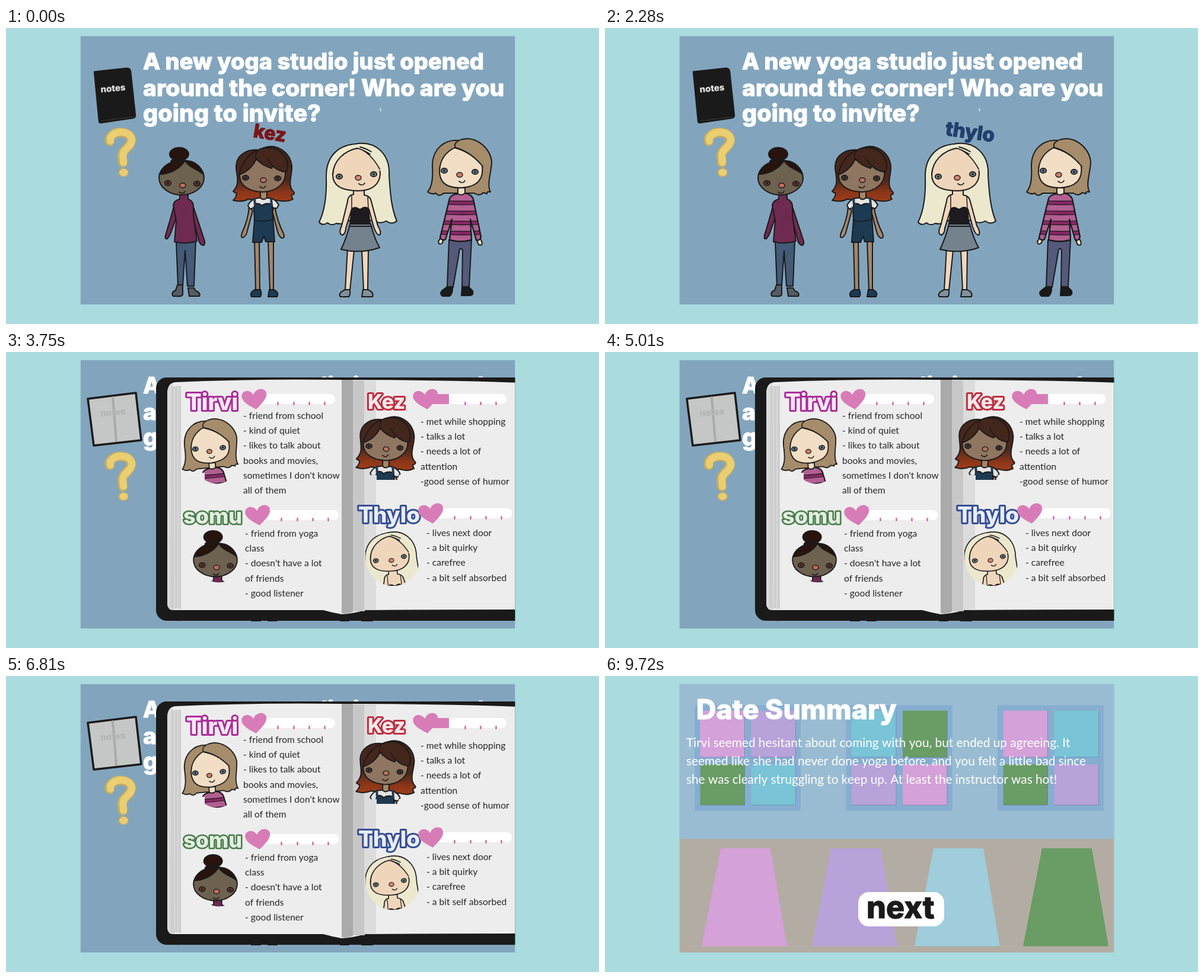
Recreate the animation shown at these times as an HTML page with a canvas. Size 1000x500 px, loop 9.75 s.

```html
<!DOCTYPE html>
<html lang="en">
<head>
<meta charset="utf-8">
<title>Yoga date</title>
<style>
html, body { margin: 0; width: 100%; height: 100%; overflow: hidden; background: #a9dbdf; }
canvas { display: block; width: 1000px; height: 500px; }
</style>
</head>
<body>
<canvas id="stage" width="1000" height="500"></canvas>
<script>
const ctx = document.getElementById('stage').getContext('2d');
const LOOP = 9750;
const INK = '#1b1a1a';
const BUBBLE = 'Inter, sans-serif';
const HAND = 'Lato, sans-serif';
const PINK = '#d4a1d9', PURPLE = '#b7a2da', CYAN = '#79c4d6', GREEN = '#6a9c65';
const PANEL = [125.5, 13.5, 733, 453.5];

function shape(d, fill, line = 2, color = INK) {
  const path = new Path2D(d);
  if (fill) { ctx.fillStyle = fill; ctx.fill(path); }
  if (line) {
    ctx.strokeStyle = color;
    ctx.lineWidth = line;
    ctx.lineJoin = ctx.lineCap = 'round';
    ctx.stroke(path);
  }
}

function oval(x, y, rx, ry, fill, line = 2) {
  ctx.beginPath();
  ctx.ellipse(x, y, rx, ry, 0, 0, 7);
  ctx.fillStyle = fill;
  ctx.fill();
  if (line) { ctx.strokeStyle = INK; ctx.lineWidth = line; ctx.stroke(); }
}

function box(x, y, w, h, fill, r = 0) {
  ctx.beginPath();
  ctx.roundRect(x, y, w, h, r);
  ctx.fillStyle = fill;
  ctx.fill();
}

function bubble(text, x, y, size, fill, outline = fill, line = 1, angle = 0) {
  ctx.save();
  ctx.translate(x, y);
  ctx.rotate(angle);
  ctx.font = `800 ${size}px ${BUBBLE}`;
  ctx.lineJoin = 'round';
  ctx.lineWidth = line;
  ctx.strokeStyle = outline;
  ctx.strokeText(text, 0, 0);
  ctx.fillStyle = fill;
  ctx.fillText(text, 0, 0);
  ctx.restore();
}

function handLines(lines, x, y, step, size, color) {
  ctx.font = `400 ${size}px ${HAND}`;
  ctx.fillStyle = color;
  lines.forEach((line, i) => ctx.fillText(line, x, y + i * step));
}

function face(left, right, nose, mouth, iris, noseColor) {
  for (const [x, y] of [left, right]) {
    oval(x, y, 5.2, 4, iris, 1.8);
    oval(x, y, 2, 1.7, INK, 0);
  }
  oval(nose[0], nose[1], 5, 4, noseColor, 1.5);
  shape(`M${mouth[0] - 5} ${mouth[1]}q6 5 10 -1`, null, 1.7);
}

const girls = {
  somu() {
    const skin = '#6d6250', hair = '#28130f', wool = '#6f2a52', denim = '#435a78';
    shape('M284 298Q277 324 269 350Q267 357 272 356Q276 352 278 346L288 318Z', wool);
    shape('M314 296Q324 326 335 360Q336 368 331 367Q326 364 325 358L315 320Z', wool);
    shape('M287 360L290 436H298L302 376L306 436H317L320 360Z', denim);
    shape('M289 434H298V450Q297 454 289 453H282Q277 447 286 443Z', '#555c63');
    shape('M307 439H317L320 444Q329 447 326 453H309Z', '#555c63');
    shape('M293 281V289Q284 291 282 299L287 326L284 361Q304 366 322 360L316 318V299Q314 291 307 289V281Z', wool);
    oval(292, 213, 16, 11, hair);
    oval(291, 226, 13, 5.5, hair);
    oval(296, 253, 38, 29, skin);
    shape('M260 247C264 231 280 224 302 224C294 237 278 246 260 247Z', hair);
    shape('M302 224C317 224 329 233 333 247C322 238 308 236 302 224Z', hair);
    face([273, 262], [322, 263], [298, 266], [297, 277], '#6b3a2d', '#c26a5c');
  },
  kez() {
    const skin = '#8f7660', limb = '#a3876b', navy = '#1d3a53';
    const hair = ctx.createLinearGradient(0, 200, 0, 292);
    hair.addColorStop(0, '#41261d');
    hair.addColorStop(.62, '#4b281d');
    hair.addColorStop(.85, '#8c3719');
    hair.addColorStop(1, '#9d3c18');
    shape('M426 206C405 204 389 215 388 233C388 249 396 262 383 276Q387 279 389 279Q388 287 383 291Q397 295 409 289Q433 294 458 291Q474 295 484 289Q481 286 482 282Q487 281 486 278C473 266 483 249 482 233C479 208 455 195 436 202Z', hair);
    shape('M410 301C409 320 404 333 398 346Q395 355 400 354Q406 350 407 342L416 309Z', limb);
    shape('M453 301C457 322 461 334 468 347Q471 355 465 355Q460 352 458 344L449 309Z', limb);
    shape('M419 358L421 442H428L427 358Z', limb);
    shape('M442 358L445 442H451V358Z', limb);
    shape('M419 442H429Q432 449 429 454H414Q410 448 419 442Z', navy);
    shape('M444 442H452Q461 447 457 454H442Z', navy);
    shape('M429 275V287Q414 287 408 300L412 306L419 303H449L456 305L460 299Q454 287 440 287V276Z', '#e6e4e2');
    shape('M429 275V287Q434 292 440 287V276Z', limb);
    shape('M418 304L420 297Q427 295 431 300Q439 294 449 298L450 319L453 361H438L435 352L431 362H416L419 324Z', navy);
    shape('M420 299L419 288M448 299L447 288', null, 4, navy);
    shape('M418 324Q435 330 451 322', null, 1.5);
    shape('M394 249C395 233 407 226 423 218C441 232 457 235 470 237C476 261 457 276 433 277C409 276 394 266 394 249Z', skin);
    shape('M424 207C412 210 397 227 393 248Q414 240 422 221Q433 233 448 237L450 233Q460 243 473 243C480 226 468 204 444 202Q430 202 424 207Z', '#43261c');
    shape('M424 208Q419 216 422 223M440 220L449 233', null, 1.5);
    face([404, 253], [458, 254], [434, 257], [433, 268], '#493c34', '#b07462');
  },
  thylo() {
    const skin = '#efd6bb', hair = '#ebe8ce', grey = '#74828e';
    shape('M588 196C556 199 540 221 540 250C541 280 538 308 528 328Q534 335 542 329Q549 335 557 330Q569 333 579 325H620Q632 332 641 326Q651 333 659 326C650 305 648 280 646 249C648 215 625 189 588 196Z', hair);
    shape('M586 273V281Q576 283 576 293L566 334Q560 347 567 350Q573 347 573 338L583 306H612L620 336Q625 350 630 350Q634 345 627 334L616 293Q615 284 604 282V273Z', skin);
    shape('M576 372L572 443H580L587 376Z', skin);
    shape('M600 374L603 443H610L611 374Z', skin);
    shape('M572 442H580Q581 451 578 454H564Q559 448 572 442Z', '#82909c');
    shape('M602 442H610Q621 446 618 454H600Z', '#82909c');
    shape('M580 332L583 306Q588 300 597 307Q605 300 611 305L614 332Z', '#1d1b1f');
    shape('M583 306V284M611 305L610 284', null, 1.5);
    shape('M580 331H615Q621 355 630 371Q599 382 565 374Q575 353 580 331Z', grey);
    shape('M580 335H615', null, 2);
    shape('M551 248C552 224 569 207 592 203C616 207 631 224 631 247C630 265 616 275 594 275C567 275 551 267 551 248Z', skin);
    shape('M588 197C556 201 548 228 551 247C553 224 571 207 593 203Q612 207 631 242C637 216 618 196 588 197Z', hair, 0);
    shape('M551 247C552 224 571 207 593 203Q614 209 630 238M593 203Q601 205 614 213M597 201Q606 203 616 209', null, 1.8);
    face([562, 251], [620, 247], [594, 253], [600, 263], '#718c8b', '#dc8674');
  },
  tirvi() {
    const skin = '#f1dec5', hair = '#a58c6b', wool = '#b25f92', denim = '#55597a';
    shape('M764 190C739 187 719 205 719 233C720 253 719 267 711 277Q718 282 725 279Q730 286 738 279H790Q798 285 805 278L811 280Q811 275 817 277C810 264 819 242 819 226C817 200 787 179 764 190Z', hair);
    shape('M733 354L729 361Q730 367 735 364L741 352Z', skin);
    shape('M792 354L797 366Q805 369 802 360L797 350Z', skin);
    shape('M747 358L744 438H754L765 374Q768 370 770 376L769 438H781L785 358Z', denim);
    shape('M744 437H753Q754 448 748 453H736Q730 448 736 443Z', INK);
    shape('M769 437H780L787 444Q789 452 782 452H768Z', INK);
    const body = 'M763 277V280Q751 281 748 288L732 354Q735 360 741 357L752 323L748 358Q767 363 785 358L783 323L793 358Q799 360 801 353L788 289Q785 281 774 279V276Z';
    shape(body, wool);
    ctx.save();
    ctx.clip(new Path2D(body));
    for (const y of [294, 311, 328, 345]) {
      shape(`M725 ${y}Q768 ${y + 3} 810 ${y}`, null, 5, '#8b2667');
      for (const edge of [-3, 3]) shape(`M725 ${y + edge}Q768 ${y + edge + 3} 810 ${y + edge}`, null, 1.3);
    }
    ctx.restore();
    shape(body, null);
    shape('M762 270V280Q768 284 774 279V270Z', skin);
    shape('M731 238C732 219 744 209 756 202Q785 210 803 232C806 255 796 268 767 270C742 270 730 261 731 238Z', skin);
    shape('M759 191C741 197 728 216 731 243Q733 214 757 202Q783 208 804 233C811 206 785 188 764 190Z', hair, 0);
    shape('M731 242Q732 214 757 202Q783 208 804 234M758 202Q754 195 764 190', null, 1.8);
    face([739, 241], [791, 243], [765, 248], [769, 259], '#68849f', '#cf7d6b');
  }
};

function questionMark() {
  const hook = 'M176 191C174 180 187 175 196 176C211 177 215 188 210 196C205 204 197 207 197 215L198 227';
  ctx.save();
  ctx.translate(-1, .5);
  shape(hook, null, 16, '#c9ad60');
  ctx.restore();
  shape(hook, null, 12, '#e9ce72');
  oval(198, 244, 8.5, 7.5, '#c9ad60', 0);
  oval(198.5, 244, 7, 6, '#e9ce72', 0);
}

function notesIcon(open) {
  if (open) {
    shape('M138 79L219 69L228 149L148 158Z', '#c5c6c6', 3.5);
    shape('M180 77L186 150', null, 4, '#a9aaaa');
  } else {
    shape('M149 74L204 68Q209 68 210 73L218 148Q218 151 214 152L160 160Q157 160 157 157Z', INK, 2.5);
    shape('M161 157L216 150', null, 1, '#3b3b3a');
  }
  bubble('notes', 160, 109, 15, open ? '#b3b5b4' : '#dededb', undefined, .2, -.09);
}

function hoverLabel(name) {
  if (name === 'kez') bubble('kez', 416, 184, 32, '#7b1518', '#6c1014', 1, .16);
  if (name === 'thylo') bubble('thylo', 573, 181, 33, '#213e6f', '#1c3158', 1, .14);
  if (name === 'tirvi') bubble('tirvi', 731, 174, 32, '#8d2476', '#7a1b66', 1, .12);
}

function chooser(open) {
  box(...PANEL, '#82a5bd');
  bubble('A new yoga studio just opened', 231, 70, 38, '#fff');
  bubble('around the corner! Who are you', 231, 115, 39, '#fff');
  bubble('going to invite?', 231, 158, 39.5, '#fff');
  shape('M631 136L632 140', null, 1.5, '#dce8ef');
  notesIcon(open);
  questionMark();
  Object.values(girls).forEach(draw => draw());
}

// Draws a girl's bust so that her nose lands at `to`.
function portrait(draw, from, to, scale, angle, clip) {
  ctx.save();
  ctx.clip(new Path2D(clip));
  ctx.translate(...to);
  ctx.rotate(angle);
  ctx.scale(scale, scale);
  ctx.translate(-from[0], -from[1]);
  draw();
  ctx.restore();
}

function loveMeter(x, y, filled = 0) {
  box(x, y - 9, 136, 17, '#fff', 8);
  if (filled) box(x, y - 9, filled, 17, '#d87cb7');
  for (const dx of [39, 66, 92, 118]) if (dx > filled) box(x + dx - 1, y + 4, 3, 6, '#d87cb7', 1);
  ctx.save();
  ctx.translate(x, y);
  ctx.rotate(-.1);
  shape('M1 17C-14 7 -22 0 -21 -8C-19 -18 -6 -18 -1 -8C4 -19 19 -19 21 -9C22 0 12 8 1 17Z', '#d87cb7', 0);
  ctx.restore();
}

function notebook() {
  const note = (lines, x, y) => handLines(lines, x, y, 25.2, 15.6, '#262626');
  box(253, 43, 640, 411, INK, 18);
  shape('M286 51Q420 45 567 47H585Q720 47 870 52V435Q690 435 606 436Q585 442 566 443Q549 440 535 436H285Q273 437 272 426V68Q273 52 286 51Z', '#ededed', 0);
  shape('M282 54Q273 57 272 68V426Q273 437 284 436Z', '#d9d9d9', 0);
  shape('M279 58L295 57V434L277 432Z', '#cecece', 0);
  shape('M284 58V433M290 58V433', null, 1.5, '#dcdcdc');
  box(585, 48, 20, 390, '#c7c7c7');
  box(604, 48, 20, 388, '#dcdcdc');
  shape('M566 47H585V439Q576 443 566 441Z', '#aaa', 0);

  portrait(girls.tirvi, [765, 248], [343, 168], .89, -.09, 'M290 104H400V204H379V214Q357 230 335 216V204H290Z');
  portrait(girls.kez, [434, 257], [641, 164], .97, .04, 'M585 100H700V208H662V216H625V208H585Z');
  portrait(girls.somu, [298, 266], [355, 364], .97, 0, 'M300 295H400V380L368 388Q356 391 347 387L300 380Z');
  portrait(girls.thylo, [594, 253], [650, 352], .82, -.08, 'M606 296H696V360A45 45 0 0 1 610 366L606 350Z');

  bubble('Tirvi', 304, 98, 38, '#f5e9f3', '#aa2c9a', 6);
  bubble('Kez', 610, 96, 34, '#f7e9e9', '#bd2f42', 6);
  bubble('somu', 299, 290, 36, '#e3eee0', '#497b4b', 5);
  bubble('Thylo', 594, 288, 37, '#e9edf6', '#344d94', 6);
  loveMeter(419, 80);
  loveMeter(708, 80, 39);
  loveMeter(425, 276);
  loveMeter(717, 273);

  note(['- friend from school', '- kind of quiet', '- likes to talk about', 'books and movies,', "sometimes I don't know", 'all of them'], 400, 113);
  note(['- met while shopping', '- talks a lot', '- needs a lot of', 'attention', '-good sense of humor'], 699, 123);
  note(['- friend from yoga', 'class', "- doesn't have a lot", 'of friends', '- good listener'], 403, 312);
  note(['- lives next door', '- a bit quirky', '- carefree', '- a bit self absorbed'], 709, 311);
}

function studioWindow(x, panes) {
  box(x, 49.5, 179, 178, '#86aed1');
  panes.forEach((color, i) => {
    const px = x + 9.5 + (i % 2) * 86, low = i > 1;
    box(px, low ? 149 : 58.5, 75, low ? 69 : 79, color);
    shape(`M${px + 75} ${low ? 149 : 59}V${low ? 218 : 137}H${px}`, null, 1, 'rgba(80,90,130,.4)');
  });
}

function summary() {
  box(...PANEL, '#b3aca2');
  box(125.5, 13.5, 733, 262, '#9abcd2');
  studioWindow(151, [PINK, PURPLE, GREEN, CYAN]);
  studioWindow(406.5, [CYAN, GREEN, PURPLE, PINK]);
  studioWindow(662, [PINK, CYAN, GREEN, PURPLE]);
  [[163, PINK], [349, PURPLE], [522, '#9fcddb'], [705, GREEN]].forEach(([x, color]) =>
    shape(`M${x} 456.5L${x + 32} 291H${x + 116}L${x + 144} 456.5Z`, color, 0));
  bubble('Date Summary', 154, 73, 46.3, '#fff');
  handLines([
    'Tirvi seemed hesitant about coming with you, but ended up agreeing. It',
    'seemed like she had never done yoga before, and you felt a little bad since',
    'she was clearly struggling to keep up. At least the instructor was hot!'
  ], 137, 120, 31, 20.8, '#fff');
  box(427, 365, 145, 58, '#fff', 18);
  bubble('next', 441, 409, 52, INK);
}

function hoveredAt(t) {
  if (t < 1100) return 'kez';
  if (t < 2650) return 'thylo';
  return t >= 7500 ? 'tirvi' : '';
}

function render(t) {
  box(0, 0, 1000, 500, '#a9dbdf');
  ctx.save();
  ctx.beginPath();
  ctx.rect(...PANEL);
  ctx.clip();
  if (t >= 7830) {
    summary();
  } else {
    const open = t >= 3150 && t < 7050;
    chooser(open);
    if (open) notebook();
    else hoverLabel(hoveredAt(t));
  }
  ctx.restore();
}

const start = performance.now();
function tick() {
  render((performance.now() - start) % LOOP);
  requestAnimationFrame(tick);
}
tick();
</script>
</body>
</html>
```
